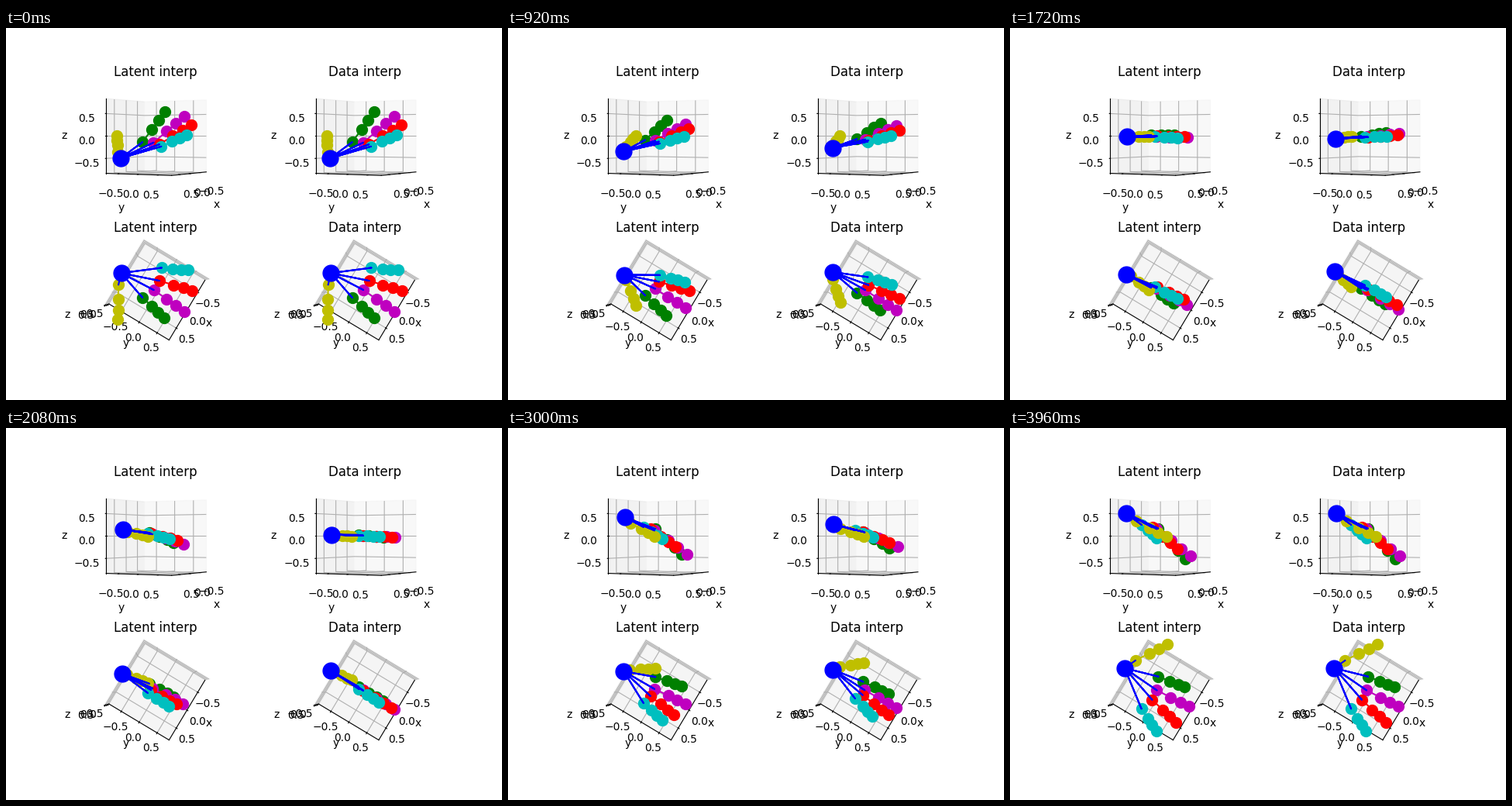
Animation, 640 px wide and 480 px high, one loop 4000 ms. Source, as a matplotlib script:

```python
import math
import numpy as np
import matplotlib.pyplot as plt
from matplotlib.animation import FuncAnimation

FRAMES = 100
UNIT = 56.75                                   # pose units per axis unit
SIDE = (1e-6, 30)                              # elevation, azimuth
TOP = (90 - 1e-6, math.degrees(math.atan2(3, 5)))
JOINTS = np.array([[0], [0.43], [0.73], [1]])  # places along a finger


def blend(a, b, w):
    return (1 - w) * np.asarray(a) + w * np.asarray(b)


def logistic(s):
    return 1 / (1 + math.exp(-7 * (s - 0.43)))


def latent_ease(s):
    low, high = logistic(0), logistic(1)
    return (logistic(s) - low) / (high - low)


class Finger:
    """Base and tip at both ends of the loop, as (right, front, up)."""

    def __init__(self, color, start, end, drift, sway=(0, 0, 0)):
        self.color = color
        self.start = blend(*start, JOINTS)
        self.end = blend(*end, JOINTS)
        self.drift, self.sway = np.array(drift), np.array(sway)

    def straight(self, w):
        return blend(self.start, self.end, w)

    def curved(self, s):
        bow = (self.drift * math.sin(math.pi * s)
               + self.sway * math.sin(2 * math.pi * s))
        return self.straight(latent_ease(s)) + (0.4 + 0.6 * JOINTS) * bow


FINGERS = [
    Finger("g", [(-19, 7, -8), (9, 32, 30)], [(-3.5, -20, 10), (31.5, -7, -30)],
           drift=(-3, 0, 1), sway=(-2, 4, -1)),
    Finger("m", [(-4.5, -3, -8.5), (34, 24.5, 25)], [(-5.5, -2.5, 9), (36.5, 19, -25.5)],
           drift=(-2, -6, -2)),
    Finger("r", [(3, -15, -11), (44.5, -2, 14.5)], [(-11.5, 9.5, 11), (19.5, 40, -16)],
           drift=(-3, -10, 0)),
    Finger("c", [(6, -32, -14), (40, -28.5, 1.5)], [(-25, 21, 14), (-6.5, 50, -2.5)],
           drift=(5, -4, -2), sway=(-3, 5, 0)),
    Finger("y", [(-51, -10, -21), (-50.5, 35.5, 0)], [(-32.5, -40, 20), (8, -62, -0.5)],
           drift=(2, 15, 0), sway=(10, -13, 0)),
]
WRIST = [(-48, -25.5, -29.5), (-45.5, -30, 30)]


def data_pose(s):
    return blend(*WRIST, s), [f.straight(s) for f in FINGERS]


def latent_pose(s):
    lift = math.sin(math.pi * s) * np.array([2, 5, -1])
    return blend(*WRIST, latent_ease(s)) + lift, [f.curved(s) for f in FINGERS]


def to_axes(points):
    a = math.radians(TOP[1])
    r, f, z = np.transpose(points) / UNIT
    return (math.cos(a) * f - math.sin(a) * r,
            math.sin(a) * f + math.cos(a) * r, z)


class Hand:
    def __init__(self, slot, title, view, pose):
        self.pose = pose
        ax = fig.add_subplot(2, 2, slot, projection="3d")
        ax.set_box_aspect((1, 1, 1), zoom=math.sqrt(3) / 1.8294640721620434)
        ax.view_init(*view)
        ax.text2D(0.5, 0.9756, title, transform=ax.transAxes, fontsize=12,
                  ha="center", va="baseline")
        self.fingers = [ax.plot([0], [0], [0], f.color + "o-", ms=10)[0]
                        for f in FINGERS]
        self.palm = ax.plot([0], [0], [0], "bo-", ms=15, markevery=[0])[0]
        for name in "xyz":
            ax.set(**{name + "label": name, name + "ticks": (-0.5, 0, 0.5),
                      name + "lim": (-5 / 6, 5 / 6)})

    def update(self, s):
        wrist, fingers = self.pose(s)
        for line, joints in zip(self.fingers, fingers):
            line.set_data_3d(*to_axes(joints))
        spokes = [p for joints in fingers for p in (wrist, joints[0])]
        self.palm.set_data_3d(*to_axes(spokes))


fig = plt.figure(figsize=(6.4, 4.8), dpi=100)
fig.subplots_adjust(left=0.125, right=0.9, bottom=0.11, top=0.88,
                    wspace=0.2, hspace=0.2)

hands = [
    Hand(1, "Latent interp", SIDE, latent_pose),
    Hand(2, "Data interp", SIDE, data_pose),
    Hand(3, "Latent interp", TOP, latent_pose),
    Hand(4, "Data interp", TOP, data_pose),
]


def draw(i):
    for hand in hands:
        hand.update(i / (FRAMES - 1))
    return []


anim = FuncAnimation(fig, draw, frames=FRAMES, interval=40, repeat=True,
                     repeat_delay=0, init_func=lambda: draw(0))
plt.show()
```
